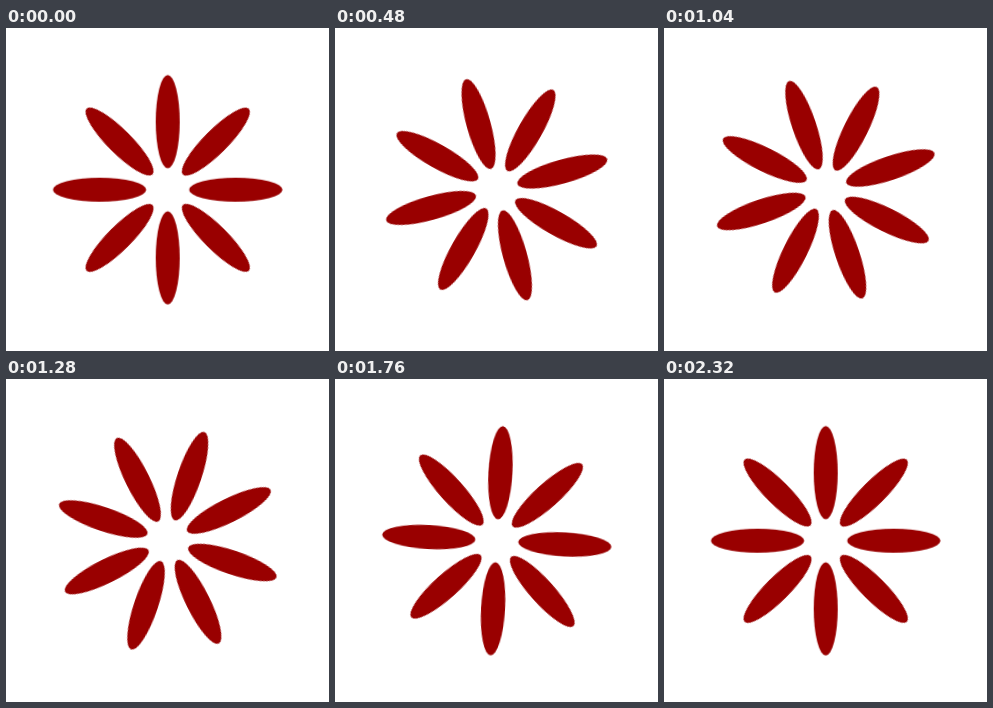
These frames come from a looping animation (323x323 px, 2.4 s). An HTML page without scripts:

```html
<!DOCTYPE html>
<html lang="en">
<head>
<meta charset="utf-8">
<title>Turning flower</title>
<style>
  html, body {
    margin: 0;
    width: 100%;
    height: 100%;
    overflow: hidden;
    background: #fff;
  }
  svg {
    display: block;
    width: 100%;
    height: 100%;
  }
  .flower {
    fill: #900;
    transform-origin: 161.75px 161.75px;
    /* 30 poses of 80 ms; the first and last coincide */
    animation: turn 2400ms steps(30, jump-none) infinite;
  }
  @keyframes turn {
    from { transform: rotate(0deg); }
    to { transform: rotate(360deg); }
  }
</style>
</head>
<body>
<svg viewBox="0 0 323 323">
  <defs>
    <ellipse id="petal" cy="-68.1" rx="12" ry="46.7"/>
    <g id="pair">
      <use href="#petal"/>
      <use href="#petal" transform="rotate(180)"/>
    </g>
    <g id="cross">
      <use href="#pair"/>
      <use href="#pair" transform="rotate(90)"/>
    </g>
  </defs>
  <g class="flower">
    <g transform="translate(161.75 161.75)">
      <use href="#cross"/>
      <use href="#cross" transform="rotate(45)"/>
    </g>
  </g>
</svg>
</body>
</html>
```
